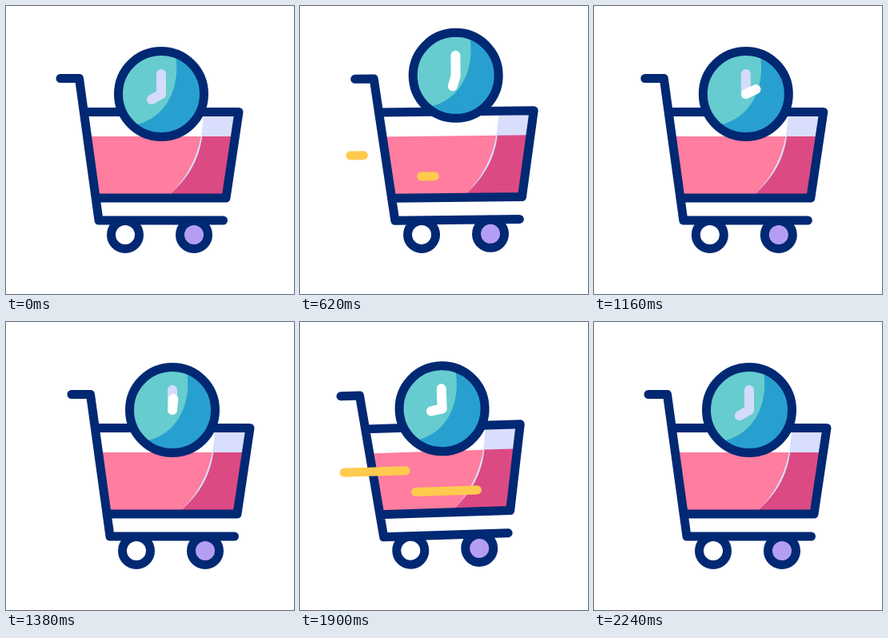
Recreate the animation shown at these times as an HTML page. Size 360 by 360 pixels, loop 2.4 s.

```html
<!DOCTYPE html>
<html lang="en">
<head>
<meta charset="utf-8">
<title>Cart and clock</title>
<style>
  html, body { margin: 0; width: 100%; height: 100%; overflow: hidden; background: #fff; }
  svg { display: block; width: 100%; height: 100%; }
  .line { fill: none; stroke: #012873; stroke-width: 11; stroke-linecap: round; stroke-linejoin: round; }
  .wind { stroke: #ffca4d; stroke-width: 11; stroke-linecap: round; }
  .hand { stroke-width: 12; stroke-linecap: round; }
</style>
</head>
<body>
<svg viewBox="0 0 360 360">
  <defs>
    <clipPath id="basket"><path d="M98 132.5H291L275 240H112Z"/></clipPath>
    <clipPath id="face"><circle cx="194" cy="110" r="53"/></clipPath>
  </defs>
  <g id="cart">
    <g clip-path="url(#basket)">
      <path fill="#ff7d9f" d="M90 163H300V250H90Z"/>
      <g clip-path="url(#basket)">
        <path id="shade" fill="#d9defc" d="M247 132C246 175 232 212 200 240H300V132Z"/>
        <path fill="#dc4a84" d="M245.2 163C241 193 228 216 200 240H300V163Z"/>
      </g>
    </g>
    <path class="line" d="M68 90.5H91.5L116 268H271.500M98 132.500H291L275 240H112"/>
    <circle class="line" cx="149" cy="286" r="17.5" style="fill:#fff"/>
    <circle class="line" cx="235" cy="286" r="17.5" style="fill:#b49ef3"/>
    <g id="clock">
      <g clip-path="url(#face)">
        <path fill="#66cccf" d="M135 51H253V169H135Z"/>
        <path fill="#28a0cf" d="M210 51C222 100 200 143 158 149V169H253V51Z"/>
      </g>
      <circle class="line" cx="194" cy="110" r="53.5"/>
      <path class="hand" id="minute" d="M194 85V110"/>
      <path class="hand" id="hour" d="M194 110V96"/>
    </g>
    <line class="wind" y1="186" y2="186" data-right="146"/>
    <line class="wind" y1="213" y2="213" data-right="234.5"/>
  </g>
</svg>
<script>
const LOOP = 2400;
const WIND_LENGTH = 85;
const PALE = '#d5dbfa';

// Tracks of [time in ms, value]
const shiftTrack = [[220, 0], [725, 2], [1000, -15], [1385, 14], [1840, -15], [2240, 0]];
const tiltTrack = [[220, 0], [400, -3.1], [720, 0], [1800, 0], [1980, -3.1], [2230, 0]];
const liftTrack = [[210, 0], [400, -22.5], [740, -22.5], [1100, 0]];
const hourTrack = [[160, 240], [2200, -120]];
const windStarts = [260, 1720];

const byId = id => document.getElementById(id);
const cart = byId('cart'), clock = byId('clock');
const minute = byId('minute'), hour = byId('hour');
const winds = document.querySelectorAll('.wind');

const clamp = p => Math.min(1, Math.max(0, p));
const ease = p => (1 - Math.cos(Math.PI * p)) / 2;

function sample(track, t) {
  if (t <= track[0][0]) return track[0][1];
  for (let i = 1; i < track.length; i++) {
    const [t0, a] = track[i - 1], [t1, b] = track[i];
    if (t < t1) return a + (b - a) * ease((t - t0) / (t1 - t0));
  }
  return track[track.length - 1][1];
}

// Each streak grows to the left, then its right end follows.
function drawWinds(t) {
  const start = windStarts.find(s => t > s && t < s + 400);
  for (const wind of winds) {
    wind.style.display = start === undefined ? 'none' : '';
    if (start === undefined) continue;
    const right = +wind.dataset.right;
    wind.setAttribute('x1', right - WIND_LENGTH * clamp((t - start) / 200));
    wind.setAttribute('x2', right - WIND_LENGTH * clamp((t - start - 200) / 200));
  }
}

function draw(t) {
  const moving = t >= 220 && t < 2240;
  const pose = moving ? t : 0;
  const tilt = sample(tiltTrack, pose);
  const lift = sample(liftTrack, pose);
  const x = sample(shiftTrack, pose);
  cart.setAttribute('transform', `translate(${x} ${tilt * 0.7}) rotate(${tilt} 180 180)`);
  clock.setAttribute('transform', `translate(0 ${lift})`);
  hour.setAttribute('transform', `rotate(${sample(hourTrack, pose)} 194 110)`);
  hour.style.stroke = moving ? '#fff' : PALE;
  minute.style.stroke = lift || tilt ? '#fff' : PALE;
  drawWinds(pose);
}

const begin = performance.now();
function tick() {
  draw((performance.now() - begin) % LOOP);
  requestAnimationFrame(tick);
}
tick();
</script>
</body>
</html>
```
